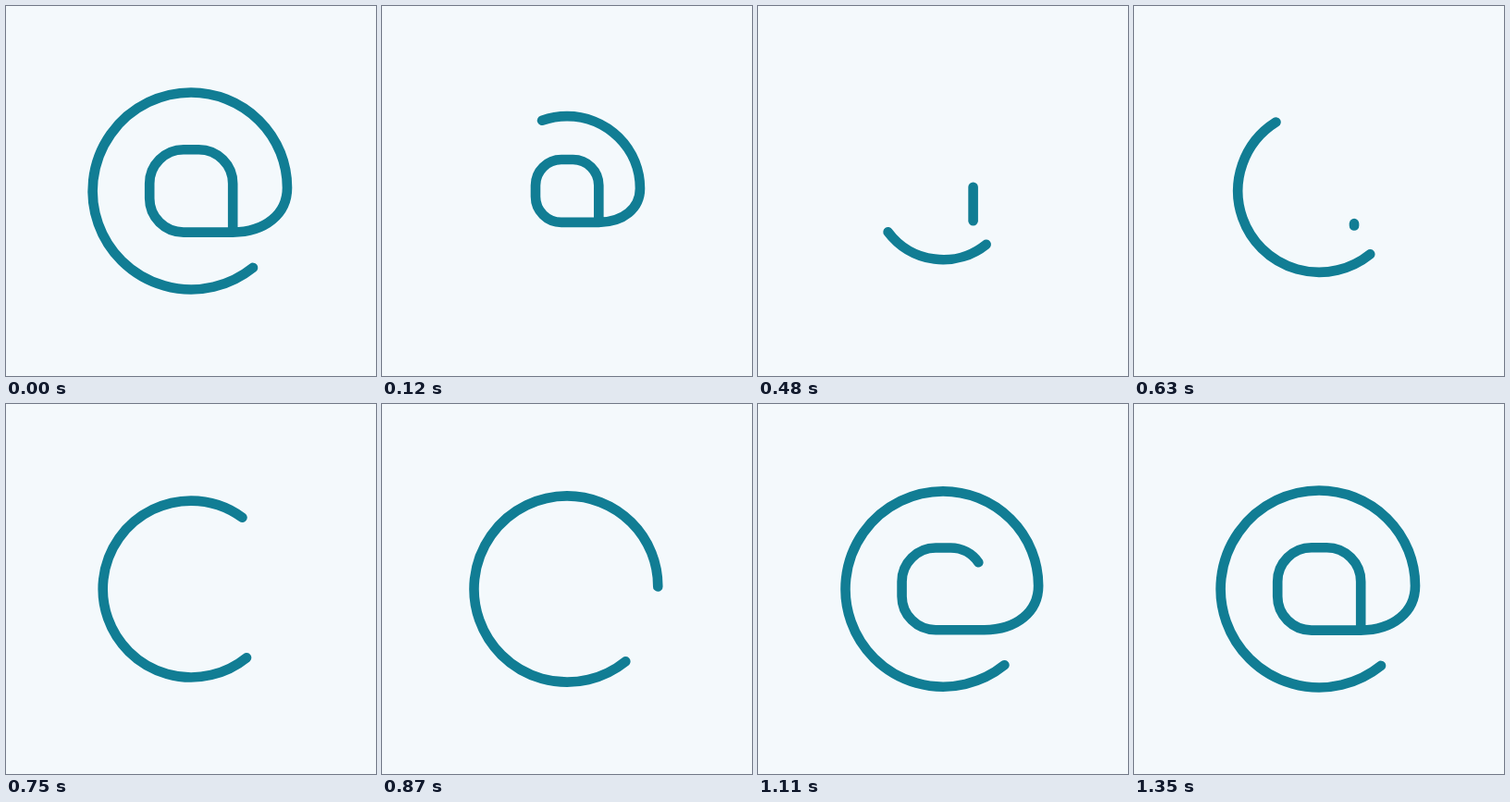
An HTML page that plays this animation: 400 by 400 pixels, repeating every 1380 ms.

```html
<!DOCTYPE html>
<html lang="en">
<head>
<meta charset="utf-8">
<title>At sign loop</title>
<style>
  html, body { margin: 0; width: 100%; height: 100%; overflow: hidden; background: #f4f9fc; }
  svg { display: block; width: 100vw; height: 100vh; }
  path { fill: none; stroke: #117d94; stroke-linecap: round; stroke-linejoin: round; }
</style>
</head>
<body>
<svg viewBox="0 0 400 400">
  <path id="tail" d="M267 282.9 A106.5 106.5 0 1 1 200 93.5 A104 103 0 0 1 304 196.5
    C304 225 280 244.5 245.2 244.6 H192 A36.8 36.6 0 0 1 155.2 208 V192
    A36.8 36.8 0 0 1 192 155.2 H208.4 A36.8 36.8 0 0 1 245.2 192 V244.6"/>
  <path id="head"/>
</svg>
<script>
  const LOOP = 1380, WIDTH = 10.6;
  const RING = 569.5; // length of the outer ring
  const tail = document.getElementById('tail');
  const head = document.getElementById('head');
  head.setAttribute('d', tail.getAttribute('d'));
  const total = tail.getTotalLength();

  // Ease-out between two times
  const easeOut = (t, from, to, power) => {
    const p = Math.min(1, Math.max(0, (t - from) / (to - from)));
    return 1 - Math.pow(1 - p, power);
  };

  const scaleAt = t => t < 414
    ? 1 - 0.375 * easeOut(t, 0, 414, 3)
    : 0.625 + 0.375 * easeOut(t, 414, LOOP, 3);

  // Shows one stretch of the path at constant stroke width
  function show(path, start, end, scale) {
    const length = end - start;
    path.style.display = length > 0.01 ? '' : 'none';
    path.setAttribute('transform', `translate(200 200) scale(${scale}) translate(-200 -200)`);
    path.setAttribute('stroke-width', WIDTH / scale);
    path.setAttribute('stroke-dasharray', `${length} ${2 * total}`);
    path.setAttribute('stroke-dashoffset', -start);
  }

  function draw(now) {
    const t = now % LOOP;
    const erased = total * easeOut(t, 0, 720, 2.65);
    const drawn = RING * easeOut(t, 345, 870, 1.2)
      + (total - RING) * easeOut(t, 870, LOOP, 2.6);
    show(tail, erased, total, scaleAt(t > 414 ? t + 25 : t));
    show(head, 0, drawn, scaleAt(t));
  }

  let origin;
  function tick(now) {
    origin ??= now;
    draw(Math.max(0, now - origin));
    requestAnimationFrame(tick);
  }
  draw(0);
  requestAnimationFrame(tick);
</script>
</body>
</html>
```
